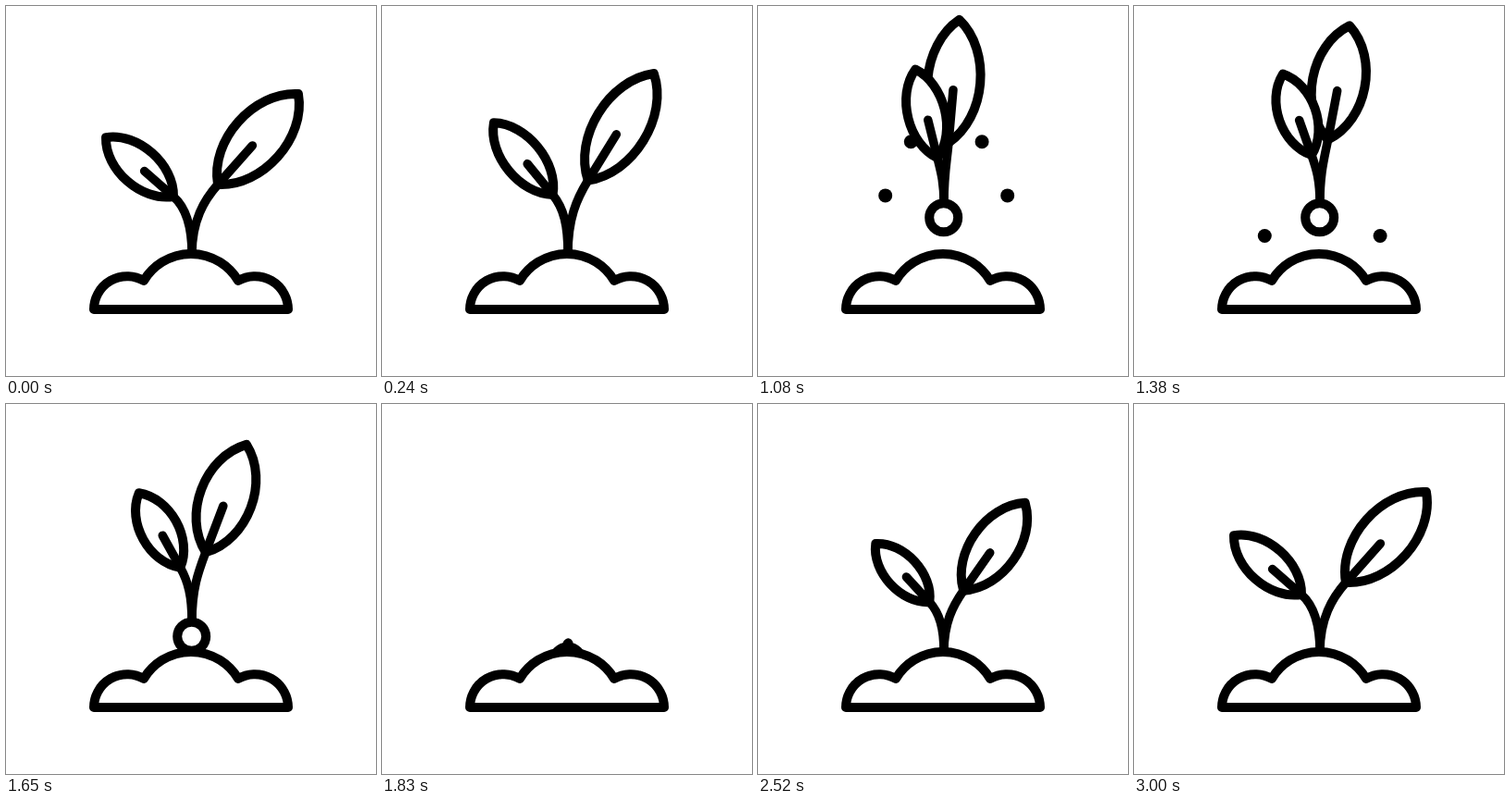
Animation, 400 px wide and 400 px high, one loop 5630 ms. Source, as an HTML page:

```html
<!DOCTYPE html>
<html lang="en">
<head>
<meta charset="utf-8">
<title>Sprout</title>
<style>
  html, body { margin: 0; width: 100%; height: 100%; overflow: hidden; background: #fff; }
  svg { display: block; width: 100%; height: 100%; }
  path, circle { fill: #fff; stroke: #000; stroke-width: 10; stroke-linecap: round; stroke-linejoin: round; }
  .stem { fill: none; stroke-width: 9.5; }
  .drop { fill: #000; stroke: none; }
</style>
</head>
<body>
<svg viewBox="0 0 400 400">
  <g id="drops"></g>
  <path id="bigLeaf"/><path id="bigStem" class="stem"/>
  <path id="smallLeaf"/><path id="smallStem" class="stem"/>
  <circle id="seed" cx="200.7" r="15.5"/>
  <path d="M95 328A36 36 0 0 1 149 297A59.3 59.3 0 0 1 251 297A36 36 0 0 1 305 328Z"/>
</svg>
<script>
const LOOP = 5630, STEP = 30;
const LAUNCH = 600, LANDING = 1860, GROW_START = 1820, GROW_END = 3000;
const BASE_X = 201, GROUND_Y = 268, JUMP = 58, GRAVITY = .000777;

// x, y and tilt run from folded to open
const BRANCHES = [
  { name: 'big', side: 1, x: [5, 28], y: [-75, -75], tilt: [5, 41.6], length: 131, width: 38 },
  { name: 'small', side: -1, x: [-7, -20], y: [-56, -62], tilt: [14, 48.8], length: 97, width: 27 }
];

const $ = id => document.getElementById(id);
const mix = ([a, b], p) => a + (b - a) * p;
const ramp = (t, from, to) => Math.min(1, Math.max(0, (t - from) / (to - from)));
const smooth = (t, from, to) => {
  const p = ramp(t, from, to);
  return p * p * (3 - 2 * p);
};

// Low wide drops and high narrow ones, mirrored
const drops = [[.1375, .519], [.08, .64]].flatMap(([vx, vy]) => [-1, 1].map(side => {
  const dot = document.createElementNS('http://www.w3.org/2000/svg', 'circle');
  dot.setAttribute('class', 'drop');
  dot.setAttribute('r', 7.5);
  return { dot: $('drops').appendChild(dot), vx: side * vx, vy };
}));

function poseAt(t) {
  const flight = ramp(t, LAUNCH, LANDING);
  const rootY = GROUND_Y - 4 * JUMP * flight * (1 - flight);
  if (t >= GROW_START) {
    const scale = 1 - (1 - ramp(t, GROW_START, GROW_END)) ** 2.4;
    return { rootY, scale, open: scale ** 1.6, stem: 1, leaf: 1 };
  }
  return {
    rootY,
    scale: 1 - ramp(t, 1650, GROW_START) ** 2,
    open: 1 - smooth(t, 0, 700) + .56 * smooth(t, 1100, 1900),
    stem: 1 + .17 * smooth(t, 0, 600) - .31 * smooth(t, 600, 1150) + .15 * smooth(t, 1150, 1700),
    leaf: 1 + .1 * smooth(t, 0, 600) - .15 * smooth(t, 600, 1500)
  };
}

function drawBranch(branch, { rootY, scale, open, stem, leaf }) {
  const x = mix(branch.x, open) * scale, y = mix(branch.y, open) * scale * stem;
  const length = branch.length * scale * leaf, width = branch.width * scale;
  const angle = branch.side * mix(branch.tilt, open) * Math.PI / 180;
  const sin = Math.sin(angle), cos = Math.cos(angle);
  const at = (along, off = 0) => [
    (BASE_X + x + along * sin + off * cos).toFixed(2),
    (rootY + y - along * cos + off * sin).toFixed(2)
  ].join(' ');
  const near = .23 * length, far = length - near, foot = at(0);
  $(branch.name + 'Leaf').setAttribute('d',
    `M${foot}C${at(near, -width)} ${at(far, -width)} ${at(length)}C${at(far, width)} ${at(near, width)} ${foot}Z`);
  $(branch.name + 'Stem').setAttribute('d',
    `M${BASE_X} ${rootY}C${BASE_X} ${rootY + y * .48} ${at(y * .3)} ${foot}L${at(length * .43)}`);
}

function draw(t) {
  const pose = poseAt(t);
  BRANCHES.forEach(branch => drawBranch(branch, pose));
  $('seed').setAttribute('cy', pose.rootY + 15.5);

  const age = t - LAUNCH;
  for (const { dot, vx, vy } of drops) {
    const y = 275 - vy * age + GRAVITY * age * age;
    dot.setAttribute('cx', 203.7 + vx * age);
    dot.setAttribute('cy', y);
    dot.style.display = age > 0 && y < 314 ? '' : 'none';
  }
}

function tick() {
  const t = performance.now() % LOOP;
  draw(Math.min(GROW_END, Math.floor(t / STEP) * STEP));
  requestAnimationFrame(tick);
}
tick();
</script>
</body>
</html>
```
